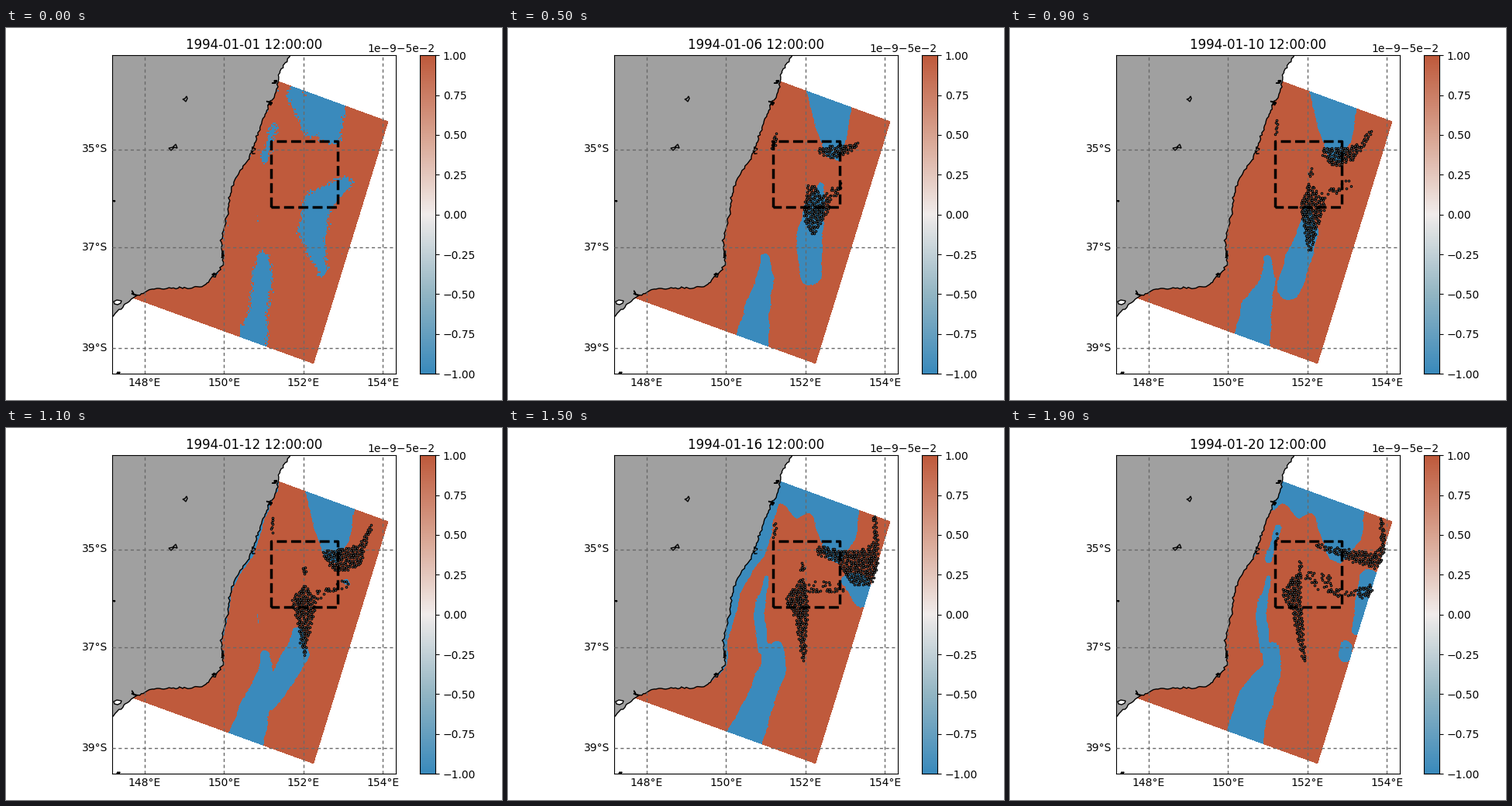
A matplotlib script that plays this animation: 640 px wide and 480 px high, repeating every 2000 ms.

```python
import numpy as np
import matplotlib.pyplot as plt
from matplotlib.animation import FuncAnimation
from matplotlib.colors import LinearSegmentedColormap

W, H, DAYS = 640, 480, 20
L, R, T, B = 137.2, 503.2, 35.22, 446.22     # map frame in pixels, y down
X0, X1, Y0, Y1 = 160, 496, 66, 436           # field raster
WARM, COOL = (191, 90, 60), (58, 138, 188)
DEG = 51.25                                  # pixels per degree of longitude
rng = np.random.default_rng(7)


def lon_px(lon):
    return 178.6 + DEG * (lon - 148)


def lat_px(south):
    """Mercator, anchored at 35 degrees south."""
    merc = [np.degrees(np.arctanh(np.sin(np.radians(v)))) for v in (south, 35)]
    return 156.5 + DEG * (merc[0] - merc[1])


def edge_dist(poly, x, y):
    """Distance into a convex polygon listed clockwise on screen."""
    best = np.full(np.shape(x), 1e9)
    for (px, py), (qx, qy) in zip(poly, poly[1:] + poly[:1]):
        dx, dy = qx - px, qy - py
        best = np.minimum(best, (dx * (y - py) - dy * (x - px)) / np.hypot(dx, dy))
    return best


def reach(spine, x, y):
    """Distance into a ribbon given by rows of (x, y, half width)."""
    best = np.full(np.shape(x), -99.)
    for (px, py, pw), (qx, qy, qw) in zip(spine[:-1], spine[1:]):
        dx, dy = qx - px, qy - py
        t = np.clip(((x - px) * dx + (y - py) * dy) / (dx * dx + dy * dy), 0, 1)
        best = np.maximum(best, pw + t * (qw - pw) - np.hypot(x - px - t * dx, y - py - t * dy))
    return best


def ribbon(keys):
    """Spine as a function of the day, blended between key days."""
    days = list(keys)
    rows = np.array(list(keys.values()), float)

    def at(day):
        return np.array([np.interp(day, days, c) for c in rows.T]).reshape(-1, 3)
    return at


def ramp(day, start, end):
    return float(np.clip((day - start) / (end - start), 0, 1))


DOMAIN = [(162, 348), (350, 68), (493.5, 120.5), (397, 433.5)]
COAST = np.array([(367, 35), (352, 58), (349, 82), (340, 97), (330, 122), (321, 150),
                  (314, 166), (300, 187), (290, 207), (285, 243), (278, 275), (281, 305),
                  (270, 319), (258, 331), (240, 335), (190, 337), (166, 346), (137, 373)])

gx, gy = np.meshgrid(np.arange(X0, X1) + .5, np.arange(Y0, Y1) + .5)
in_domain = edge_dist(DOMAIN, gx, gy) > 0
offshore = abs(gx - np.interp(gy, COAST[:, 1], COAST[:, 0]))
rough = rng.normal(size=((Y1 - Y0) // 2, (X1 - X0) // 2)).repeat(2, 0).repeat(2, 1)
wave = np.sin(gy / 5 + np.sin(gx / 7)) + np.sin(gx / 6 + np.sin(gy / 4))

# Cool tongues of water
eddy = ribbon({0: (438, 200, 8, 402, 226, 18, 395, 262, 18, 408, 316, 5),
               7: (390, 205, 3, 394, 235, 11, 386, 275, 17, 384, 318, 18),
               12: (372, 280, 8, 370, 305, 17, 350, 335, 15, 325, 360, 12),
               16: (338, 285, 9, 338, 310, 12, 332, 340, 11, 322, 370, 12)})
south = ribbon({0: (331, 296, 7, 331, 318, 13, 326, 365, 11, 318, 405, 20),
                9: (332, 298, 5, 333, 325, 9, 318, 362, 20, 312, 405, 24),
                14: (337, 285, 7, 338, 310, 14, 326, 360, 18, 305, 402, 25),
                19: (334, 285, 8, 335, 308, 9, 313, 350, 20, 303, 400, 25)})
east = ribbon({10: (434, 198, -2, 436, 199, -1, 438, 200, -2),
               14: (436, 197, 10, 450, 199, 17, 458, 208, 13),
               19: (464, 195, 13, 457, 225, 12, 447, 262, 6)})


def cool_level(day):
    low = 152 + 22 * ramp(day, 0, 6)
    north = [(386, 60), (440 + day, 80), (438 + day, 108), (430 + 1.25 * day, 145),
             (426, low), (406, low - 6), (398, 132), (386, 100)]
    ear = [(372, 84, 10 - 8 * day), (398, 122, 18 - 8 * day)]
    near = 5.5 * max(1 - day / 2.5, ramp(day, 16, 19)) - 1
    inshore = [(346, 128, near - 1), (333, 170, near)]
    spread = ramp(day, 10, 15)
    streak = [(326 + 8 * spread, 235 - 42 * spread, 5 * spread - 2),
              (324, 236, 8 * spread - 1), (329, 285, 10 * spread - 3)]
    spot = 11 * ramp(day, 15, 19) - 3
    level = edge_dist(north, gx, gy)
    for spine in (ear, inshore, streak, eddy(day), south(day), east(day),
                  [(434, 282, spot), (433, 294, spot)]):
        level = np.maximum(level, reach(spine, gx, gy))

    # Shelf water hugging the coast, and the ledge along the northern edge
    width = 18 * np.exp(-((day - 14.5) / 3.2) ** 2)
    shape = np.clip(np.minimum((345 - gy) / 180, (gy - 20) / 130), 0, 1)
    level = np.maximum(level, width * shape - 1.5 - offshore)
    floor = 70 + 38 * ramp(day, 11, 15) + .35 * (gx - 365) - 7 * np.cos((gx - 354) / 5.5)
    ledge = np.minimum(floor - gy, 404 - gx)
    return np.maximum(level, np.where(day > 11, ledge, -99))


def field(day):
    noise = rough * (.3 + 1.5 * np.exp(-day / 1.2)) + .5 * wave
    img = np.zeros(gx.shape + (4,), np.uint8)
    img[..., :3] = np.where((cool_level(day) + noise > 0)[..., None], COOL, WARM)
    img[..., 3] = 255 * in_domain
    return img


# Crowds of drifters
plume = ribbon({3: (404, 157, 5, 420, 157, 6, 432, 155, 5, 438, 155, 4, 444, 155, 2),
                8: (404, 158, 6, 416, 164, 12, 432, 160, 8, 448, 153, 4, 464, 138, 2),
                13: (422, 168, 8, 440, 174, 18, 456, 172, 18, 470, 148, 5, 475, 115, 2),
                15: (404, 158, 7, 430, 166, 9, 457, 179, 25, 474, 150, 4, 473, 113, 2),
                19: (396, 151, 2, 435, 163, 7, 472, 171, 10, 482, 152, 3, 478, 115, 2)})
funnel = ribbon({3: (392, 212, 8, 400, 228, 20, 398, 240, 13, 396, 250, 5),
                 7: (389, 203, 4, 396, 230, 15, 391, 248, 13, 389, 277, 3),
                 12: (384, 206, 4, 381, 226, 17, 383, 245, 10, 383, 297, 2),
                 19: (373, 187, 4, 363, 213, 12, 370, 235, 7, 379, 300, 2)})
arm = ribbon({3: (412, 222, 6, 422, 212, 6, 432, 202, 3),
              11: (392, 222, 6, 412, 210, 5, 437, 201, 6),
              19: (384, 190, 6, 402, 198, 12, 422, 212, 6)})
tail = ribbon({15: (440, 190, -2, 452, 195, -2, 463, 198, 0),
               19: (430, 214, 3, 446, 211, 5, 464, 212, 11)})

STEP = 3.5
cols, rows = np.meshgrid(np.arange(46), np.arange(66))
lattice = np.stack([330 + STEP * (cols + rows % 2 / 2), 105 + STEP * .87 * rows], -1)
lattice = lattice.reshape(-1, 2) + rng.normal(scale=.45, size=(cols.size, 2))
chance = rng.random(cols.size)


def drifters(day):
    x, y = (lattice + (-.25 * day, .15 * day)).T
    cy = np.interp(day, (3, 10, 19), (155, 123, 142))
    thin = 2.6 - .06 * day
    px, py = 399.3 - 1.33 * day, 194.6 - 1.08 * day
    late = 3 - 8 * (1 - ramp(day, 3, 6))
    crowds = [(plume, 1), (funnel, 1), (arm, .45), (tail, .8),
              (lambda d: [(345, cy - 9, thin), (342, cy + 9, thin)], 1),
              (lambda d: [(px, py - 3, late - 1), (px, py + 4, late)], 1)]
    shy = 8 * max(3 - day, 0)
    seen = np.zeros(x.shape, bool)
    for spine, share in crowds:
        seen |= (reach(spine(day), x, y) > shy) & (chance < share)
    seen &= edge_dist(DOMAIN, x, y) > -1
    return x[seen], y[seen]


def jagged(line, amp, step=3):
    """Resample a line by length and shake the new points."""
    run = np.r_[0, np.cumsum(np.hypot(*np.diff(line, axis=0).T))]
    s = np.linspace(0, run[-1], int(run[-1] / step))
    out = np.c_[np.interp(s, run, line[:, 0]), np.interp(s, run, line[:, 1])]
    out[1:-1] += rng.normal(scale=amp, size=(len(out) - 2, 2))
    return out


fig = plt.figure(figsize=(W / 100, H / 100), dpi=100)
ax = fig.add_axes([L / W, 1 - B / H, (R - L) / W, (B - T) / H])
title = ax.set_title("")
water = ax.imshow(field(0), extent=(X0, X1, Y1, Y0), interpolation="nearest",
                  aspect="auto", zorder=1)
ax.set(xlim=(L, R), ylim=(B, T), xticks=[], yticks=[])

shore = jagged(COAST, .8)
ax.fill(*np.vstack([shore, [(L - 2, T - 2)]]).T, color="#a0a0a0", lw=0, zorder=2)
ax.plot(*shore.T, color="k", lw=1, zorder=3)

# Inlets and islets: x, y, half width, half height
for x, y, a, b in ((347, 69, 4, 3), (340, 97, 4, 3), (319, 159, 3, 6), (268, 318, 3, 2),
                   (166, 343, 4, 4), (280, 293, 2, 6), (145, 445, 2, 1), (139, 223, 2, 1)):
    ax.plot(*(rng.uniform(-1, 1, (10, 2)) * (a, b) + (x, y)).T, color="k", lw=1, zorder=3)
for lake, face in (
        ([(228, 92), (231, 91), (233, 88), (234, 91), (232, 95), (230, 93)], "#a0a0a0"),
        ([(210, 155), (215, 154), (219, 150), (221, 155), (217, 154), (213, 158)], "#a0a0a0"),
        ([(139, 353), (143, 351), (149, 352), (148, 355), (144, 357), (140, 356)], "w")):
    ax.fill(*np.transpose(lake), fc=face, ec="k", lw=1, zorder=3)

dots, = ax.plot([], [], "o", ms=1.8, mfc="#777777", mec="k", mew=.75, zorder=5)
ax.plot([342, 342, 428, 428, 342], [231, 146, 146, 231, 231], "k--", lw=2.5, zorder=6)

grid = dict(color="dimgray", lw=1, ls=(0, (3, 2.6)), zorder=4)
for lon in range(148, 155, 2):
    ax.axvline(lon_px(lon), **grid)
    ax.text(lon_px(lon), 462, f"{lon}°E", ha="center", va="baseline")
for lat in (35, 37, 39):
    ax.axhline(lat_px(lat), **grid)
    ax.text(131, lat_px(lat), f"{lat}°S", ha="right", va="center")

# Colour scale
shades = np.array([COOL, (147, 182, 196), (241, 236, 235), (216, 163, 144), WARM]) / 255
cax = fig.add_axes([534 / W, 1 - B / H, 20 / W, (B - T) / H])
cax.imshow(np.linspace(-1, 1, 256)[:, None], extent=(0, 1, -1, 1), origin="lower",
           cmap=LinearSegmentedColormap.from_list("heat", shades), aspect="auto")
cax.yaxis.tick_right()
cax.set(xticks=[], yticks=np.linspace(-1, 1, 9))
cax.text(1, 1 + 2 * 4.3 / (B - T), "1e\u22129\u22125e\u22122", ha="right", va="baseline")


def draw(day):
    title.set_text(f"1994-01-{day + 1:02d} 12:00:00")
    water.set_data(field(day))
    dots.set_data(*drifters(day))
    return title, water, dots


anim = FuncAnimation(fig, draw, frames=DAYS, interval=100, repeat=True, repeat_delay=0,
                     init_func=lambda: draw(0))
plt.show()
```
